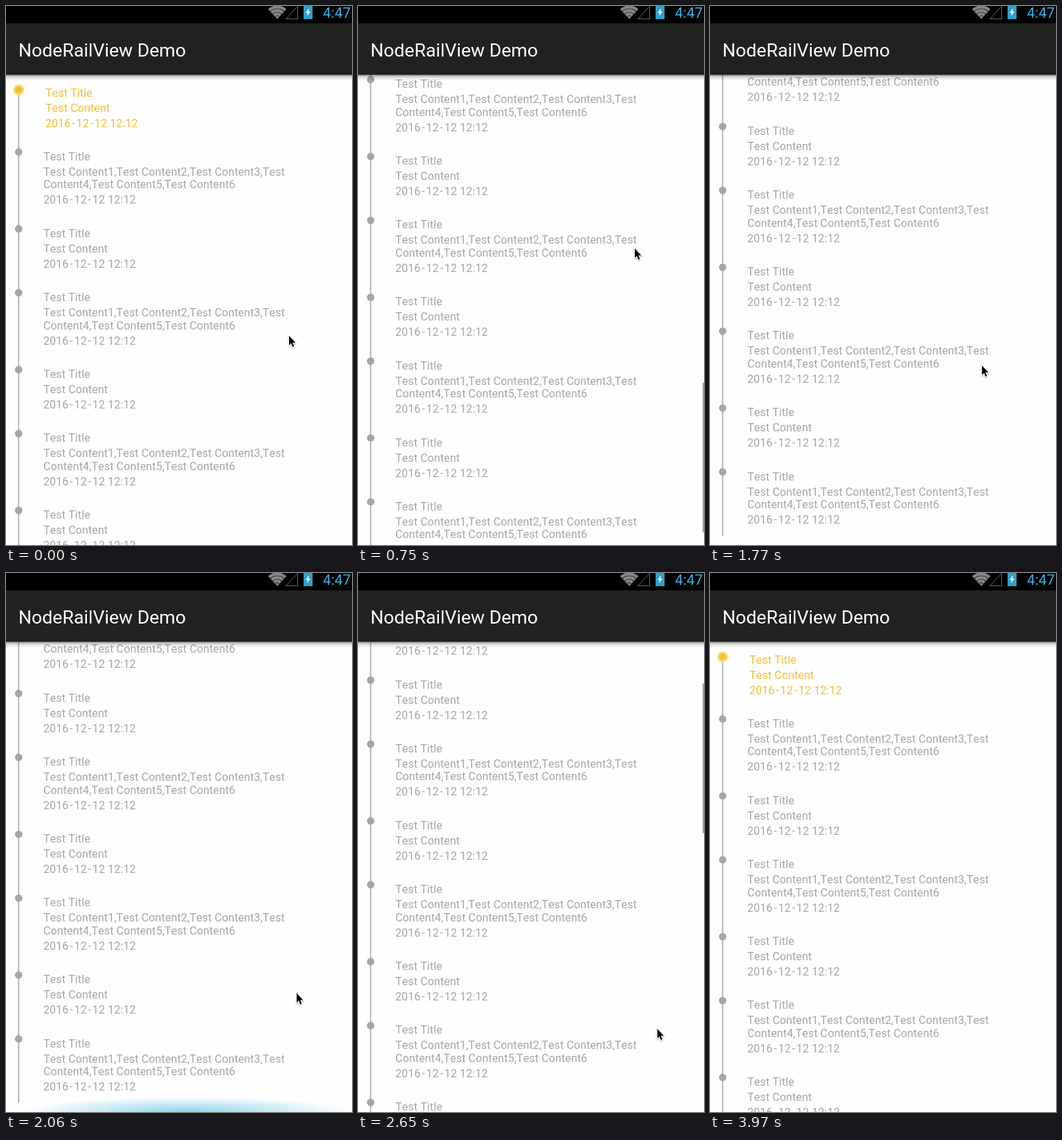
Recreate the animation shown at these times as an HTML page with a canvas. Size 500 by 778 pixels, loop 4.12 s.

```html
<!DOCTYPE html>
<html lang="en">
<head>
<meta charset="utf-8">
<title>Timeline list</title>
<style>
  html, body { margin: 0; height: 100%; overflow: hidden; background: #fefefe; }
  canvas { display: block; }
</style>
</head>
<body>
<canvas id="stage" width="500" height="778"></canvas>
<script>
const ctx = document.getElementById('stage').getContext('2d');
const LOOP = 4120, STEPS = 28;
const W = 500, H = 778, TOP = 99.6, AXIS = 18.3;
const MAX_SCROLL = 1367, OVERFLING = 8;
const BOTTOM_HIT = 7, TOP_HIT = 20, PULL = 12.5;   // steps at which an edge is reached
const GRAY = '#a6a6a6', YELLOW = '#f4bf30', BLUE = '51,176,222';

// Pointer turning points: step, x, y
const pointerPath = [[0, 409, 476], [3, 402, 332], [7, 398, 368], [12, 393, 519],
  [16, 447, 694], [21, 406, 592], [24, 447, 714], [27, 474, 784]];

const clamp = v => Math.min(1, Math.max(0, v));
const easeOut = p => 1 - (1 - clamp(p)) ** 3;
const smooth = p => p * p * (3 - 2 * p);
const bump = d => Math.max(0, 1 - Math.abs(d));

// One fling to the end, one back, each with a short overshoot
function scrollAt(step) {
  return MAX_SCROLL * (easeOut((step - 1) / 5.85) - easeOut((step - 15.97) / 4.03))
    + OVERFLING * (bump(step - BOTTOM_HIT) - bump(step - TOP_HIT));
}

function pointerAt(step) {
  const i = Math.max(1, pointerPath.findIndex(k => k[0] >= step));
  const [s0, x0, y0] = pointerPath[i - 1], [s1, x1, y1] = pointerPath[i];
  const p = smooth((step - s0) / (s1 - s0));
  return [x0 + (x1 - x0) * p, y0 + (y1 - y0) * p];
}

const shown = (step, from, to) => step < from ? 0 : clamp((to - step) / 2);

function box(x, y, w, h, fill) {
  ctx.fillStyle = fill;
  ctx.fillRect(x, y, w, h);
}

function dot(x, y, r, fill) {
  ctx.fillStyle = fill;
  ctx.beginPath();
  ctx.arc(x, y, r, 0, 7);
  ctx.fill();
}

function poly(points, fill, stroke, width = 1) {
  ctx.beginPath();
  points.forEach(([x, y]) => ctx.lineTo(x, y));
  ctx.closePath();
  if (stroke) {
    ctx.strokeStyle = stroke;
    ctx.lineWidth = width;
    ctx.stroke();
  }
  if (fill) {
    ctx.fillStyle = fill;
    ctx.fill();
  }
}

// Hyphens get wide sidebearings
function text(str, x, y, size, fill, spacing = 0) {
  ctx.font = `${size}px Roboto, sans-serif`;
  ctx.fontKerning = 'none';
  ctx.letterSpacing = spacing + 'px';
  ctx.fillStyle = fill;
  for (const part of str.split(/(-)/)) {
    const pad = part === '-' ? 1.75 : 0;
    ctx.fillText(part, x + pad, Math.round(y));
    x += ctx.measureText(part).width + 2 * pad;
  }
}

function fade(g, ...colors) {
  colors.forEach((c, i) => g.addColorStop(i / (colors.length - 1), c));
  return g;
}

function row(i, scroll) {
  const long = i % 2, active = i === 0;
  const y = 125 + 203.2 * (i >> 1) + 92.2 * long - scroll;
  if (y < 0 || y > H + 30) return;
  const x = active ? 57 : 54, color = active ? YELLOW : GRAY;
  const lines = long
    ? ['Test Content1,Test Content2,Test Content3,Test', 'Content4,Test Content5,Test Content6']
    : ['Test Content'];
  if (active) dot(AXIS, y - 4, 8, '#fae08f');
  dot(AXIS, active ? y - 4 : y - 6.5, 5.4, color);
  text('Test Title', x, y + 5.5, 16, color, .13);
  lines.forEach((line, n) => text(line, x, y + 27.5 + 18.6 * n, 16, color, .13));
  text('2016-12-12 12:12', x, y + 49.5 + 18.6 * long, 16, color, .13);
}

// A bright edge at the hit, then a soft glow that swells and dies
function glow(y, age) {
  const strength = Math.sin(Math.PI * clamp(age / 4)), edge = age < 0 ? 0 : 1 - clamp(age);
  const tint = a => `rgba(${BLUE},${a})`;
  ctx.save();
  ctx.translate(260, y);
  ctx.scale(240, 22);
  box(-1, -1, 2, 2, fade(ctx.createRadialGradient(0, 0, 0, 0, 0, 1),
    tint(.6 * strength), tint(.3 * strength), tint(0)));
  ctx.restore();
  box(12, y - 3, 476, 6, fade(ctx.createLinearGradient(12, 0, 488, 0),
    tint(0), tint(edge), tint(edge), tint(edge), tint(edge), tint(0)));
}

function statusBar() {
  box(0, 0, W, 25, '#000');
  ctx.strokeStyle = '#868686';
  ctx.lineWidth = 4.3;
  for (let r = 7.5; r < 20; r += 5) {
    ctx.beginPath();
    ctx.arc(392, 19, r, -Math.PI * .735, -Math.PI * .265);
    ctx.stroke();
  }
  poly([[392, 19], [388.5, 14.5], [395.5, 14.5]], '#868686');
  poly([[421.5, .5], [421.5, 18.5], [404.5, 18.5]], null, '#666');
  box(430, 0, 13, 19, '#2f9fc9');
  poly([[438, 3], [433, 10], [436, 10], [435, 15], [440, 8], [437, 8]], '#fff');
  text('4:47', 458, 17, 20.8, '#33b5e5');
}

function header() {
  box(0, TOP, W, 8, fade(ctx.createLinearGradient(0, TOP, 0, TOP + 8),
    'rgba(0,0,0,.36)', 'rgba(0,0,0,.1)', 'rgba(0,0,0,.02)'));
  box(0, 25, W, TOP - 25, '#212121');
  text('NodeRailView Demo', 18, 73, 26.7, '#fff');
}

function pointer([x, y]) {
  const shape = [[0, 0], [0, 13.5], [3, 10.8], [5.2, 16], [7.4, 15], [5.2, 10], [9.4, 10]];
  ctx.save();
  ctx.translate(x, y);
  ctx.shadowColor = 'rgba(0,0,0,.35)';
  ctx.shadowBlur = 2;
  ctx.shadowOffsetY = 1;
  poly(shape, null, '#fff', 2);
  ctx.shadowColor = 'transparent';
  poly(shape, '#000');
  ctx.restore();
}

function draw(step) {
  const scroll = scrollAt(step);
  box(0, 0, W, H, '#fefefe');
  box(AXIS - .8, 121 - scroll, 1.6, 2011, GRAY);
  for (let i = 0; i < 20; i++) row(i, scroll);
  glow(TOP, step - TOP_HIT);
  glow(H, step - BOTTOM_HIT);
  glow(H, step - PULL);
  const bar = shown(step, 1, 11) + shown(step, 15, 24);
  box(498, 104 + 454 * clamp(scroll / MAX_SCROLL), 2, 216, `rgba(160,160,160,${bar})`);
  header();
  statusBar();
  pointer(pointerAt(step));
}

// The picture advances in held steps
function tick(now) {
  draw(Math.floor(((now + 2) % LOOP) * STEPS / LOOP));
  requestAnimationFrame(tick);
}
requestAnimationFrame(tick);
</script>
</body>
</html>
```
